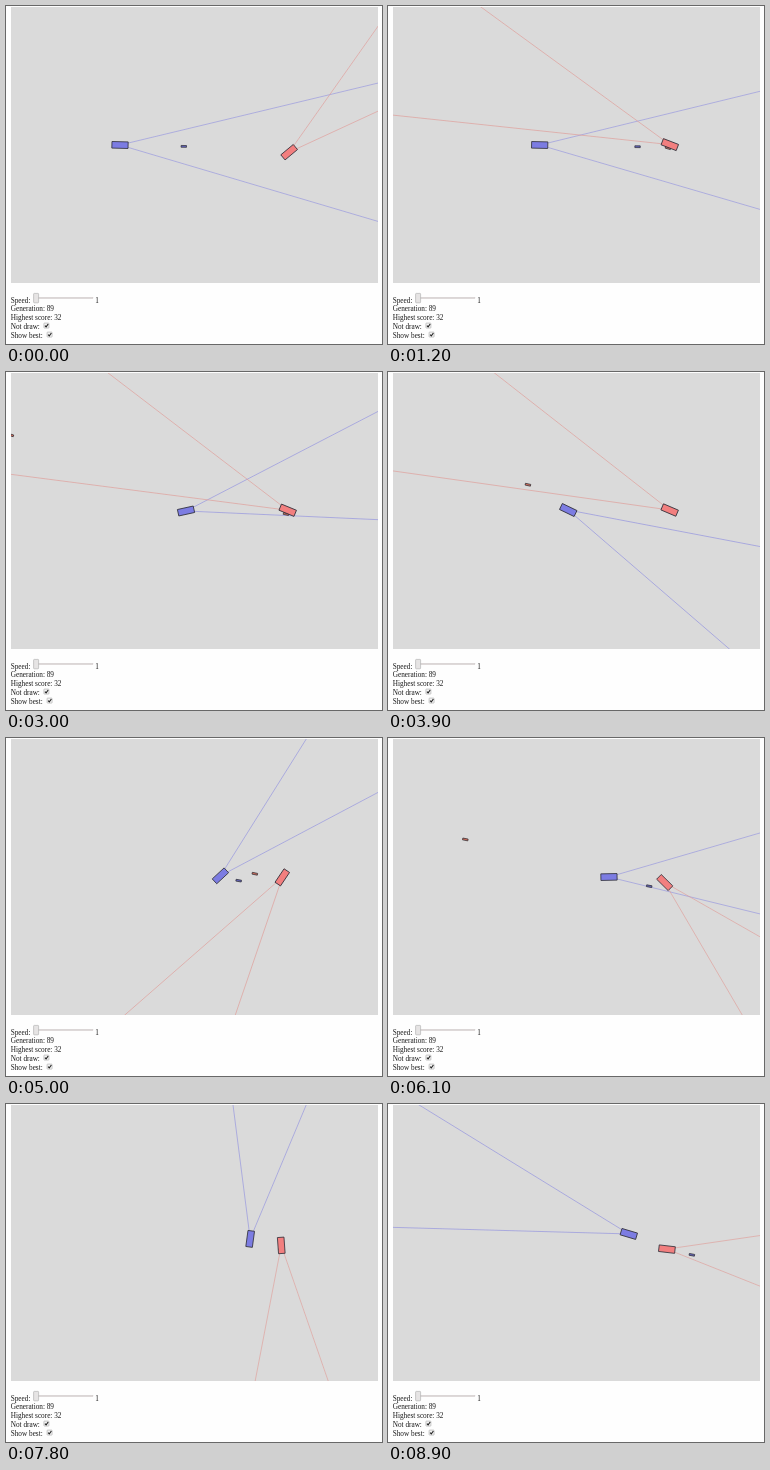
Write an HTML page that moves like this. It is 376x338 px and loops after 9 s.

```html
<!DOCTYPE html>
<html lang="en">
<head>
<meta charset="utf-8">
<title>Car duel</title>
<style>
  html, body { margin: 0; width: 100%; height: 100%; overflow: hidden; background: #fefefe; }
  svg { display: block; width: 376px; height: 338px; }
  text { font: 7.25px "Liberation Serif", "Times New Roman", serif; fill: #1a1a1a; }
  .car { stroke: #30303a; stroke-width: .8; }
  .sight { fill: none; stroke-width: .6; }
  .blue .car { fill: #7c7ce2; }
  .red .car { fill: #f27f7f; }
  .blue .sight { stroke: #9090e0; }
  .red .sight { stroke: #e09c98; }
  .shot { stroke: #2c2c32; stroke-width: .7; }
  .blue.shot { fill: #6666c0; }
  .red.shot { fill: #d9705f; }
  .box { fill: #f4f4f4; stroke: #a5a5a5; stroke-width: .6; }
  .tick { fill: none; stroke: #222; stroke-width: 1.1; }
</style>
</head>
<body>
<svg viewBox="0 0 376 338">
  <defs>
    <clipPath id="arena"><rect x="5" y="1" width="367" height="276"/></clipPath>
    <path id="rays" d="M483 -129.4L0 0L483 129.4"/>
    <rect id="body" x="-8.1" y="-3.3" width="16.2" height="6.6"/>
    <g id="check">
      <rect class="box" x=".3" y=".3" width="5" height="5" rx=".6"/>
      <path class="tick" d="M1.3 2.8L2.5 4.1L4.6 1.2"/>
    </g>
  </defs>
  <rect x="5" y="1" width="367" height="276" fill="#dadada"/>
  <g clip-path="url(#arena)">
    <g class="blue"><use class="sight" href="#rays" data-car="blue"/></g>
    <g class="red"><use class="sight" href="#rays" data-car="red"/></g>
    <g class="blue"><use class="car" href="#body" data-car="blue"/></g>
    <g id="shots"></g>
    <g class="red"><use class="car" href="#body" data-car="red"/></g>
  </g>
  <text x="4.7" y="297">Speed:</text>
  <rect x="28" y="291.3" width="59" height="1.3" fill="#dcd6d6" stroke="#c4bcbc" stroke-width=".3"/>
  <rect x="27.6" y="287.4" width="5" height="9.4" rx=".7" fill="#e6e4e4" stroke="#aaa" stroke-width=".6"/>
  <text x="89.3" y="297">1</text>
  <text x="4.7" y="305.2">Generation: 89</text>
  <text x="4.7" y="313.6">Highest score: 32</text>
  <text x="4.7" y="322.5">Not draw:</text>
  <use href="#check" x="37.6" y="316.8"/>
  <text x="4.7" y="331.5">Show best:</text>
  <use href="#check" x="40.8" y="325.8"/>
</svg>
<script>
  const STEP = 100, STEPS = 90;
  const TURN = 9, CYCLE = 2 * TURN;          // steps per full turn; turn plus straight run
  const FIRST_TURN = 13, LAST_TURN = FIRST_TURN + 3 * CYCLE;

  const sin = deg => Math.sin(deg * Math.PI / 180);
  const cos = deg => Math.cos(deg * Math.PI / 180);

  // Number of steps blue has spent turning; from LAST_TURN on it never stops.
  function turnedSteps(n) {
    const u = Math.max(0, n - FIRST_TURN);
    if (n >= LAST_TURN) return 3 * TURN + n - LAST_TURN;
    return TURN * Math.floor(u / CYCLE) + Math.min(TURN, u % CYCLE);
  }

  // Blue drives right and circles in between, veering left a little midway.
  function blueAt(n) {
    const turned = turnedSteps(n), spin = -40.1 * turned;
    const veer = 1.5 - 16 * Math.exp(-(((n - 35) / 11) ** 2));
    return {
      x: 114 + 3.14 * (n - turned) - 4.6 * sin(spin),
      y: 134.4 + 4.6 * cos(spin),
      a: spin + veer
    };
  }

  // Red circles all the time while its centre drifts slowly.
  function redAt(n) {
    const a = -39.8 - 39.927 * n;
    return { x: 280.4 - .011 * n - 4.3 * sin(a), y: 142.9 - .023 * n + 4.3 * cos(a), a };
  }

  const place = (el, { x, y, a }) =>
    el.setAttribute("transform", `translate(${x} ${y}) rotate(${a})`);

  const layer = document.getElementById("shots");
  function addShot(side, from, { x, y }, a, speed, nose, endX) {
    const el = document.createElementNS("http://www.w3.org/2000/svg", "rect");
    const attrs = { class: `${side} shot`, x: -2.7, y: -.9, width: 5.4, height: 1.8 };
    for (const key in attrs) el.setAttribute(key, attrs[key]);
    layer.append(el);
    return n => {
      const d = nose + speed * (n - from);
      const pos = { x: x + d * cos(a), y: y + d * sin(a), a };
      el.style.display = n >= from && pos.x < endX ? "" : "none";
      place(el, pos);
    };
  }

  const shots = [];
  // Blue fires once per turn length; its later shots go wide and fly past red.
  for (let n = -5; n < STEPS; n += TURN) {
    const aim = Math.min(10.5, Math.abs(n) * .2);
    shots.push(addShot("blue", n, blueAt(n), aim, 14.5, 7, aim > 9 ? 380 : 275));
  }
  for (let n = 12; n < 60; n += CYCLE)
    shots.push(addShot("red", n, { x: 280, y: 142 }, 191 + 720 / n ** 2, 15.9, 0, 380));

  const cars = [...document.querySelectorAll("[data-car]")];
  function draw() {
    const n = Math.floor(performance.now() / STEP) % STEPS;
    const pose = { blue: blueAt(n), red: redAt(n) };
    cars.forEach(el => place(el, pose[el.dataset.car]));
    shots.forEach(move => move(n));
    requestAnimationFrame(draw);
  }
  draw();
</script>
</body>
</html>
```
